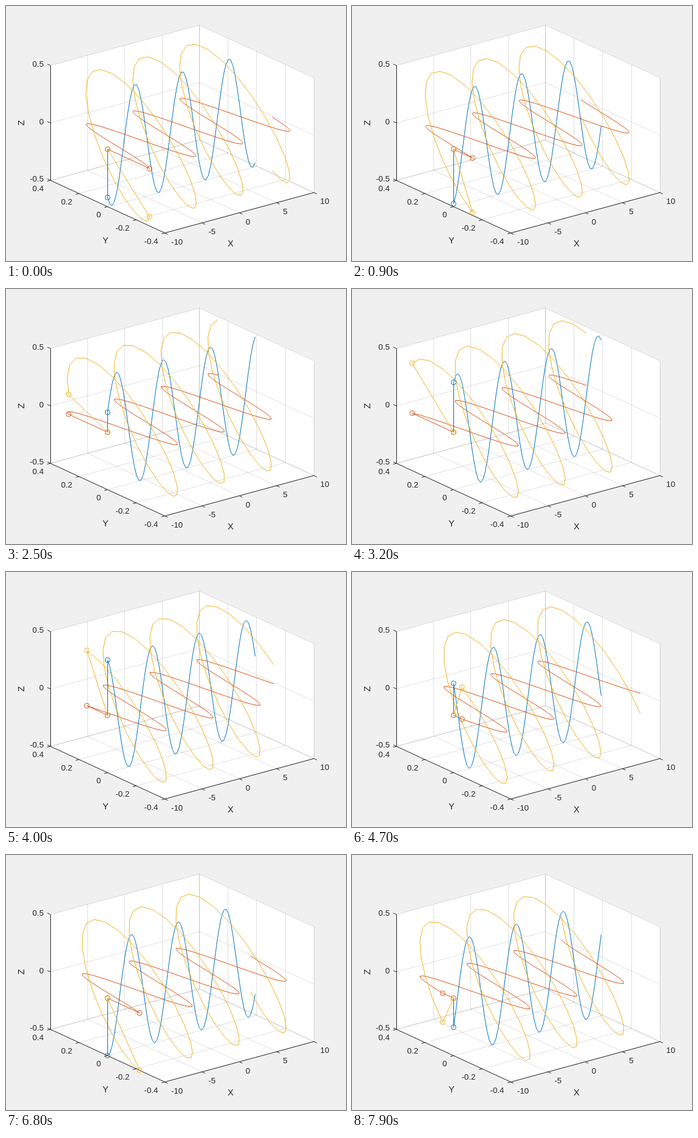
An HTML page with a canvas for the animation above (8000 ms loop, 560 by 420 pixels).

```html
<!DOCTYPE html>
<html>
<head>
<meta charset="utf-8">
<style>
html, body { margin: 0; width: 100%; height: 100%; overflow: hidden; background: #f0f0f0; }
canvas { display: block; }
</style>
</head>
<body>
<canvas id="stage" width="560" height="420"></canvas>
<script>
const ctx = document.getElementById('stage').getContext('2d');
const INK = '#262626', GRID = 'rgba(38,38,38,.15)';
const BLUE = '#0072bd', RED = '#d95319', GOLD = '#edb120';
const FONT = '"Liberation Sans", Arial, sans-serif';
const X = [-10, -5, 0, 5, 10], Y = [-0.4, -0.2, 0, 0.2, 0.4], Z = [-0.5, 0, 0.5];

// Orthographic projection of data coordinates to pixels
const project = ([x, y, z]) => [
  261.5 + 12.28 * (x + 10) - 235.5 * (y + 0.4),
  373.8 - 3.325 * (x + 10) - 108.3 * (y + 0.4) - 189.2 * (z + 0.5)
];

function stroke(pixels, color) {
  ctx.beginPath();
  pixels.forEach(p => ctx.lineTo(...p));
  ctx.strokeStyle = color;
  ctx.stroke();
}

function line(points, color) {
  const pixels = points.map(project);
  // Keep vertical lines crisp
  if (pixels.every(p => Math.abs(p[0] - pixels[0][0]) < 0.01))
    pixels.forEach(p => p[0] = Math.floor(p[0]) + 0.5);
  stroke(pixels, color);
}

function circle(point, color) {
  ctx.beginPath();
  ctx.arc(...project(point), 4, 0, 2 * Math.PI);
  ctx.strokeStyle = color;
  ctx.stroke();
}

function text(str, x, y, align, size = 13.33) {
  ctx.font = size + 'px ' + FONT;
  ctx.textAlign = align;
  ctx.fillStyle = INK;
  ctx.fillText(str, x, y);
}

function tick(point, dx, dy, labelX, labelY, align, label) {
  const [x, y] = project(point);
  stroke([[x, y], [x + dx, y + dy]], INK);
  text(label, x + labelX, y + labelY, align);
}

function drawAxes() {
  ctx.fillStyle = '#f0f0f0';
  ctx.fillRect(0, 0, 560, 420);
  ctx.beginPath();
  [[-10, .4, .5], [10, .4, .5], [10, -.4, .5], [10, -.4, -.5], [-10, -.4, -.5], [-10, .4, -.5]]
    .forEach(p => ctx.lineTo(...project(p)));
  ctx.fillStyle = '#fff';
  ctx.fill();

  for (const x of X) {
    line([[x, .4, -.5], [x, .4, .5]], GRID);
    line([[x, .4, -.5], [x, -.4, -.5]], GRID);
  }
  for (const y of Y) {
    line([[10, y, -.5], [10, y, .5]], GRID);
    line([[10, y, -.5], [-10, y, -.5]], GRID);
  }
  for (const z of Z) {
    line([[-10, .4, z], [10, .4, z]], GRID);
    line([[10, .4, z], [10, -.4, z]], GRID);
  }

  line([[-10, -.4, -.5], [10, -.4, -.5]], INK);
  line([[-10, -.4, -.5], [-10, .4, -.5]], INK);
  line([[-10, .4, -.5], [-10, .4, .5]], INK);
  for (const x of X) tick([x, -.4, -.5], 4.9, 2.3, 10.5, 19, 'left', x);
  for (const y of Y) tick([-10, y, -.5], -5.3, 1.4, -11, 17.7, 'right', y);
  for (const z of Z) tick([-10, .4, z], -4.9, -2.3, -11, 2, 'right', z);

  text('X', 370, 396, 'center', 14.67);
  text('Y', 164, 391, 'center', 14.67);
  ctx.save();
  ctx.translate(30, 192.5);
  ctx.rotate(-Math.PI / 2);
  text('Z', 0, 0, 'center', 14.67);
  ctx.restore();
}

function drawWaves(time) {
  const yWave = x => 0.3 * Math.cos(x + time + Math.PI / 4);
  const zWave = x => 0.5 * Math.cos(x + time);
  const waves = [
    [BLUE, x => [x, 0, zWave(x)]],
    [RED, x => [x, yWave(x), 0]],
    [GOLD, x => [x, yWave(x), zWave(x)]]
  ];
  const xs = Array.from({ length: 67 }, (_, i) => -10 + 0.3 * i);
  const origin = [-10, 0, 0];
  for (const [color, at] of waves) line(xs.map(at), color);
  for (const [color, at] of waves) {
    line([origin, at(-10)], color);
    circle(origin, color);
    circle(at(-10), color);
  }
}

const start = performance.now();
function draw() {
  const step = Math.floor((performance.now() - start) % 8000 / 100);
  ctx.lineWidth = 1;
  ctx.lineJoin = 'round';
  drawAxes();
  drawWaves(step * 0.1);
  requestAnimationFrame(draw);
}
draw();
</script>
</body>
</html>
```
